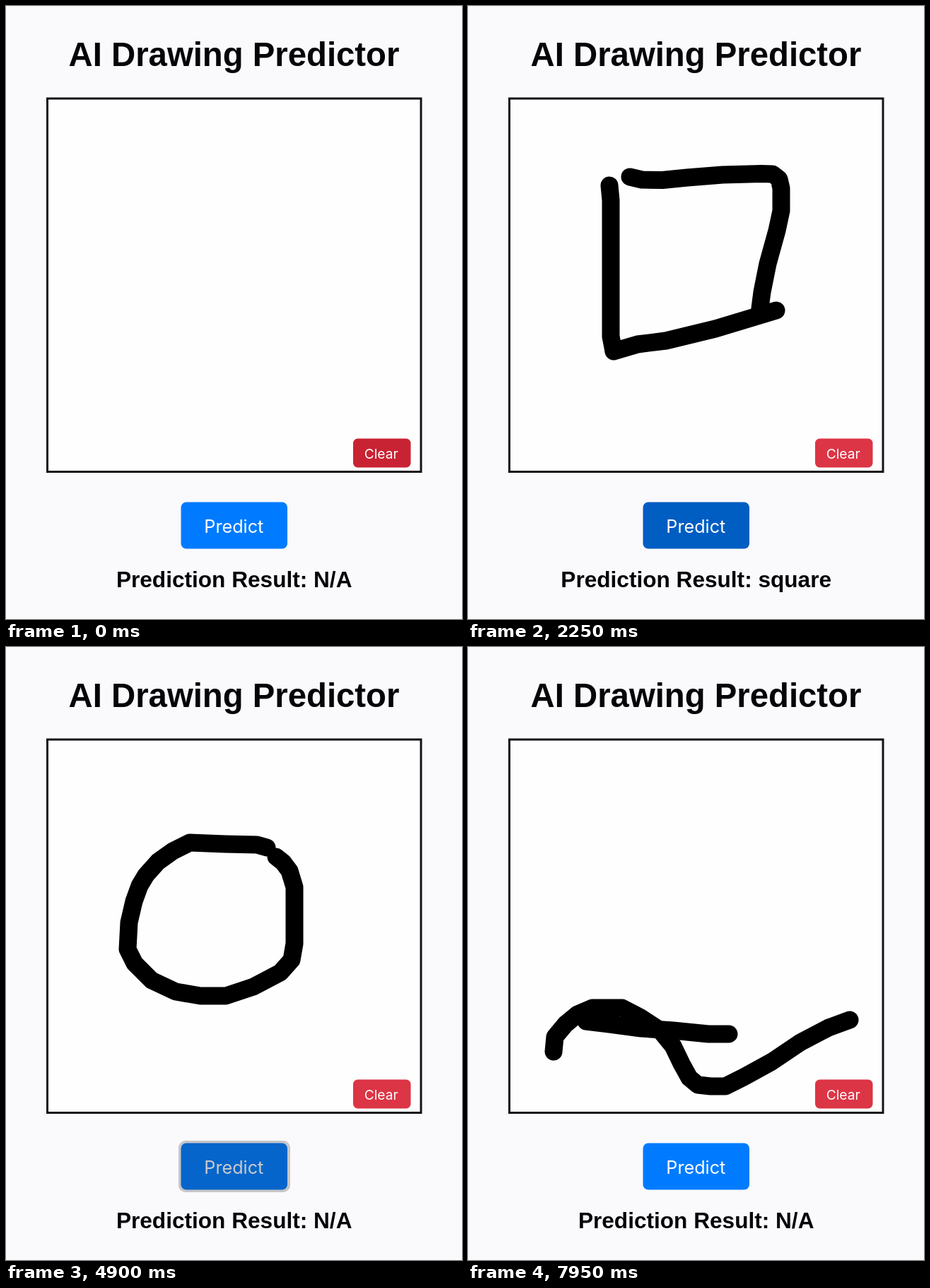
These frames come from a looping animation (645 by 868 pixels, 8 s). An HTML page:

```html
<!DOCTYPE html>
<html lang="en">
<head>
<meta charset="utf-8">
<title>AI Drawing Predictor</title>
<style>
  html, body { margin: 0; width: 100%; height: 100%; overflow: hidden; background: #faf9fc; }
  svg { display: block; width: 645px; height: 868px; }
  text { text-anchor: middle; }
  .heading { font-family: "Liberation Sans", Arial, sans-serif; font-weight: 700; fill: #050408; }
  .label { font-family: Inter, Roboto, sans-serif; fill: #fff; }
  .tap { fill: rgba(26, 26, 26, .23); }
  #ink { fill: none; stroke: #000; stroke-width: 25; stroke-linecap: round; stroke-linejoin: round; }
</style>
</head>
<body>
<svg viewBox="0 0 645 868">
  <rect width="645" height="868" fill="#faf9fc"/>
  <text class="heading" x="322.5" y="84.5" font-size="47.3">AI Drawing Predictor</text>
  <rect x="58.5" y="131" width="528.5" height="528.5" fill="#fefefe" stroke="#141117" stroke-width="3"/>
  <g id="ink"></g>
  <g id="clear">
    <rect class="face" x="491" y="612.5" width="81.5" height="41" rx="6.5"/>
    <text class="label" x="530.7" y="640.5" font-size="19.2">Clear</text>
    <rect class="tap" x="488" y="609" width="88" height="48" rx="9"/>
  </g>
  <g id="predict">
    <rect class="face" x="247.5" y="702.5" width="150.5" height="66" rx="7.5"/>
    <text class="label" x="322.3" y="745.5" font-size="25.2">Predict</text>
    <rect class="tap" x="244" y="699" width="158" height="73" rx="10"/>
  </g>
  <text id="result" class="heading" x="322.7" y="823" font-size="31.6"></text>
</svg>
<script>
const LOOP = 8000, STEP = 50, FADE = 300, TAP = 150;

// keys: [time, share of the line drawn]; the line stays until `gone`
const strokes = [
  { d: 'M200 254L202 275V468L205.5 486', keys: [[100, 0], [400, 1]], gone: 3100 },
  { d: 'M229 242L246 246L275 246.5L310 243L360 239L415 237.5L431 238L440 245L443 258V290L437 318L424 365L416 405L413 428',
    keys: [[700, 0], [850, .455], [1100, 1]], gone: 3100 },
  { d: 'M206 489L240 479L280 474L350 457L436 431', keys: [[1360, 0], [1500, 1]], gone: 3100 },
  { d: 'M369 284L355 280L310 279L260 277L236 289L215 304L198 323L189 338L181 360L174 390L172 428L182 448L206 472L240 488L275 494H311L350 481L388 461L404 443L408 420V340L401 317L392 305L382 297',
    keys: [[3560, 0], [3750, .262], [4350, 1]], gone: 5750 },
  { d: 'M121 573L123 552L138 534L155 520L176 511H218L243 524L272 543L290 565L302 590L313 610L325 620L343 622H364L390 609L430 587L470 560L510 539L540 528',
    keys: [[6400, 0], [7050, 1]], gone: LOOP },
  { d: 'M167 530L200 534L245 540L290 543L340 548H369', keys: [[7710, 0], [7950, 1]], gone: LOOP }
];

const buttons = [
  { id: 'clear', rest: [220, 53, 69], dark: [200, 35, 51], hovers: [[-FADE, 150], [2950, 3500], [5600, 6450]] },
  { id: 'predict', rest: [0, 123, 255], dark: [0, 86, 179], hovers: [[2100, 2950], [4900, 5600]] }
];

const results = [[2250, 3100, 'square'], [5050, 5750, 'circle']];

const clamp = x => Math.min(1, Math.max(0, x));
const $ = id => document.getElementById(id);

// cubic-bezier(.25, .1, .25, 1)
function ease(x) {
  x = clamp(x);
  const curve = (a, b, u) => 3 * a * u * (1 - u) ** 2 + 3 * b * u * u * (1 - u) + u ** 3;
  let low = 0, high = 1;
  for (let i = 0; i < 20; i++) {
    const mid = (low + high) / 2;
    if (curve(.25, .25, mid) < x) low = mid; else high = mid;
  }
  return curve(.1, 1, low);
}

function track(keys, t) {
  let value = 0;
  for (let i = 1; i < keys.length; i++) {
    const [t0, v0] = keys[i - 1], [t1, v1] = keys[i];
    if (t > t0) value = v0 + (v1 - v0) * clamp((t - t0) / (t1 - t0));
  }
  return value;
}

for (const stroke of strokes) {
  stroke.path = document.createElementNS('http://www.w3.org/2000/svg', 'path');
  stroke.path.setAttribute('d', stroke.d);
  stroke.path.setAttribute('pathLength', 1);
  $('ink').append(stroke.path);
}
for (const button of buttons) {
  button.face = $(button.id).querySelector('.face');
  button.tap = $(button.id).querySelector('.tap');
}

function render(t) {
  for (const { path, keys, gone } of strokes) {
    const drawn = track(keys, t);
    path.style.display = drawn > 0 && t < gone ? '' : 'none';
    path.setAttribute('stroke-dasharray', drawn < 1 ? `${drawn} 2` : 'none');
  }
  for (const { face, tap, rest, dark, hovers } of buttons) {
    const level = hovers.reduce((sum, [on, off]) => sum + ease((t - on) / FADE) - ease((t - off) / FADE), 0);
    face.setAttribute('fill', `rgb(${rest.map((c, i) => Math.round(c + (dark[i] - c) * level))})`);
    tap.style.display = hovers.some(([on]) => t >= on && t < on + TAP) ? '' : 'none';
  }
  const hit = results.find(([from, to]) => t >= from && t < to);
  $('result').textContent = `Prediction Result: ${hit ? hit[2] : 'N/A'}`;
}

const start = performance.now();
function frame() {
  const t = (performance.now() - start) % LOOP;
  render(Math.floor(t / STEP) * STEP);
  requestAnimationFrame(frame);
}
frame();
</script>
</body>
</html>
```
